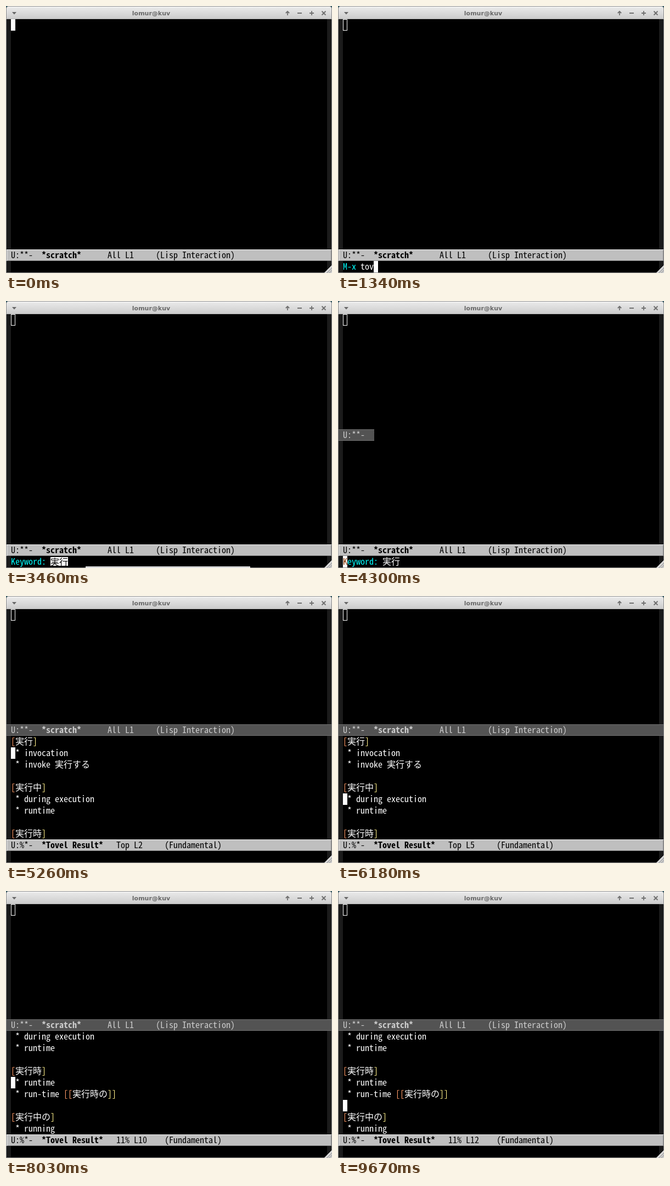
An HTML page that plays this animation: 594x487 px, repeating every 9.8 s.

```html
<!DOCTYPE html>
<html lang="ja">
<head>
<meta charset="utf-8">
<title>Editor session</title>
<style>
  html, body { margin: 0; width: 100%; height: 100%; overflow: hidden; background: #000; }
  #stage { position: relative; width: 594px; height: 487px; overflow: hidden; background: #000;
    font: 16px/19px "Noto Sans Mono CJK JP", "Noto Sans CJK JP", monospace; color: #fff; }
  #stage div { position: absolute; white-space: pre; box-sizing: border-box; }
  #title { left: 0; top: 0; width: 594px; height: 24px; background: #24515c; }
  #title svg { display: block; }
  #title text { font: bold 11px "DejaVu Sans", sans-serif; fill: #686868; text-anchor: middle; }
  .fringe { top: 24px; width: 8px; height: 462px; background: #1a1a1a; }
  .edge { background: #8c8c8c; }
  .mode { left: 1px; width: 592px; height: 21px; padding-left: 8px; overflow: hidden; }
  .active { top: 444px; background: #bfbfbf; color: #000;
    box-shadow: inset 1px 1px #f0f0f0, inset -1px -1px #858585; }
  .inactive { top: 234px; background: #535353; color: #ccc;
    box-shadow: inset 0 1px #707070, inset 0 -1px #707070; }
  #result { left: 9px; top: 255px; width: 576px; height: 189px; overflow: hidden; line-height: 21px; }
  #lines { left: 0; top: -1px; }
  #mini { left: 9px; top: 465px; height: 21px; }
  #mini span { color: #0ff; }
  .cursor { width: 8px; height: 21px; background: #fff; color: #000; }
  #home { left: 9px; top: 24px; }
  #home.hollow { background: none; border: 1px solid #fff; }
  #preedit { left: 81px; top: 467px; height: 16px; line-height: 16px; background: #fff; color: #000; }
  #popup { top: 484px; height: 3px; background: #dcdcdc; }
  i { font-style: normal; }
  .open { color: #ff9a66; }
  .close { color: #fff08a; }
  #grip { left: 580px; top: 473px; }
  #grip svg { display: block; }
</style>
</head>
<body>
<div id="stage">
  <div class="fringe" style="left:1px"></div>
  <div class="fringe" style="left:585px"></div>
  <div class="mode inactive" id="upper">U:**-  <b>*scratch*</b>      All L1     (Lisp Interaction)</div>
  <div id="result"><div id="lines"></div></div>
  <div class="mode active" id="lower"></div>
  <div class="cursor" id="home"></div>
  <div id="mini"></div>
  <div class="cursor" id="point"></div>
  <div class="edge" style="left:0;top:24px;width:1px;height:463px"></div>
  <div class="edge" style="left:593px;top:24px;width:1px;height:463px"></div>
  <div class="edge" style="left:0;top:486px;width:594px;height:1px"></div>
  <div id="preedit"></div>
  <div id="popup"></div>
  <div id="grip"><svg width="14" height="14">
    <path d="M14 0V14H0Z" fill="#d0d0d0"/>
    <path d="M0 14 14 0" stroke="#f4f4f4"/>
    <path d="M5 14 14 5M9 14 14 9" stroke="#8a8a8a"/>
  </svg></div>
  <div id="title"><svg width="594" height="24">
    <defs><linearGradient id="bar" x2="0" y2="1">
      <stop offset="0" stop-color="#ececec"/><stop offset="1" stop-color="#cbcbcb"/>
    </linearGradient></defs>
    <path d="M.5 24V5Q.5.5 5 .5H589Q593.5.5 593.5 5V24" fill="url(#bar)" stroke="#8c8c8c"/>
    <path d="M4 1.5H590" stroke="#fafafa"/>
    <path d="M0 23.5H594" stroke="#b4b4b4"/>
    <path d="M11 11H19L15 15.5Z" fill="#666"/>
    <path d="M513 17V11M509.8 13 513 9.8 516.2 13M531 13H539M553 13H561M557 9V17M575.5 9.5 582.5 16.5M582.5 9.5 575.5 16.5"
      fill="none" stroke="#707070" stroke-width="1.8"/>
    <text x="264.5" y="17">lomur@kuv</text>
  </svg></div>
</div>
<script>
const LOOP = 9800, CELL = 8, ROW = 21, LEFT = 9, MINI_TOP = 465, RESULT_TOP = 255;
const $ = id => document.getElementById(id);

const lines = [
  '[実行]', ' * invocation', ' * invoke 実行する', '',
  '[実行中]', ' * during execution', ' * runtime', '',
  '[実行時]', ' * runtime', ' * run-time [[実行時の]]', '',
  '[実行中の]', ' * running'
];
$('lines').innerHTML = lines.join('\n')
  .replace(/\[/g, '<i class="open">[</i>').replace(/\]/g, '<i class="close">]</i>');

const prompt = (label, typed = '') => `<span>${label}</span>${typed}`;

// Each step changes part of the state; the rest carries over.
const steps = [[0, {
  home: 'block', mini: '', miniCol: -1, preedit: '', popup: [0, 0],
  upper: 0, shown: false, line: 1, label: 1, scroll: 0, lit: true
}]];
const at = (time, change) => steps.push([time, change]);

at(440, { home: 'hollow', mini: prompt('M-x ') });
at(480, { miniCol: 4 });
[920, 1060, 1200, 1350, 1490].forEach((time, i) =>
  at(time, { mini: prompt('M-x ', 'tovel'.slice(0, i + 1)), miniCol: 5 + i }));
at(1900, { mini: prompt('Keyword: '), miniCol: 9 });

// Input method: the text changes first, its suggestion window follows.
[
  [2360, 'ｊ', 0, 0], [2575, 'じ', 97, 204], [2790, 'じｋ', 113, 220],
  [2965, 'じっｋ', 129, 240], [3140, 'じっこ', 129, 260], [3320, 'じっこう', 145, 300]
].forEach(([time, preedit, x, width]) => {
  at(time, { preedit, miniCol: -1 });
  at(time + 40, { popup: [x, width] });
});
at(3460, { preedit: '実行' });
at(3500, { popup: [0, 0] });
at(3610, { preedit: '', mini: prompt('Keyword: ', '実行') });
at(3650, { miniCol: 13 });
at(4150, { miniCol: 0 });
at(4300, { upper: 65 });
at(4340, { upper: 592, shown: true, mini: '', miniCol: -1 });

at(4790, { lit: false });
at(5260, { line: 2, label: 2, lit: true });
[5530, 5745, 5960, 6175, 6390, 6590, 6810, 7040].forEach((time, i) => {
  const line = i + 3;
  at(time, { line, scroll: line > 9 ? 5 : 0 });
  at(time + 40, { label: line });
});
[7530, 8030, 8530, 9030].forEach((time, i) => at(time, { lit: i % 2 === 1 }));
at(9370, { line: 11 });
at(9410, { label: 11 });
at(9670, { line: 12, label: 12 });

const show = (el, visible) => { el.style.display = visible ? 'block' : 'none'; };

function place(col, top, char = '', color = '#000') {
  const { style } = $('point');
  style.left = LEFT + col * CELL + 'px';
  style.top = top + 'px';
  style.color = color;
  $('point').textContent = char;
}

function draw(s) {
  $('home').classList.toggle('hollow', s.home === 'hollow');
  $('mini').innerHTML = s.mini;
  $('preedit').textContent = s.preedit;
  show($('preedit'), s.preedit);
  $('popup').style.left = s.popup[0] + 'px';
  $('popup').style.width = s.popup[1] + 'px';
  $('upper').style.width = s.upper + 'px';
  show($('upper'), s.upper);
  show($('result'), s.shown);
  $('lines').style.top = -1 - s.scroll * ROW + 'px';

  const position = `${s.label > 9 ? '11%' : 'Top'} L${s.label}`.padEnd(11);
  $('lower').innerHTML = s.shown
    ? `U:%*-  <b>*Tovel Result*</b>   ${position}(Fundamental)`
    : 'U:**-  <b>*scratch*</b>      All L1     (Lisp Interaction)';

  show($('point'), s.shown ? s.lit : s.miniCol >= 0);
  if (s.shown) {
    const char = lines[s.line - 1][0] || '';
    place(0, RESULT_TOP + (s.line - 1 - s.scroll) * ROW, char, '#1678b4');
  } else if (s.miniCol === 0) {
    place(0, MINI_TOP, 'K', '#8a3a08');
  } else {
    place(s.miniCol, MINI_TOP);
  }
}

let last = -1;
function tick() {
  const time = performance.now() % LOOP;
  const count = steps.filter(([start]) => start <= time).length;
  if (count !== last) {
    last = count;
    draw(Object.assign({}, ...steps.slice(0, count).map(([, change]) => change)));
  }
  requestAnimationFrame(tick);
}
tick();
</script>
</body>
</html>
```
